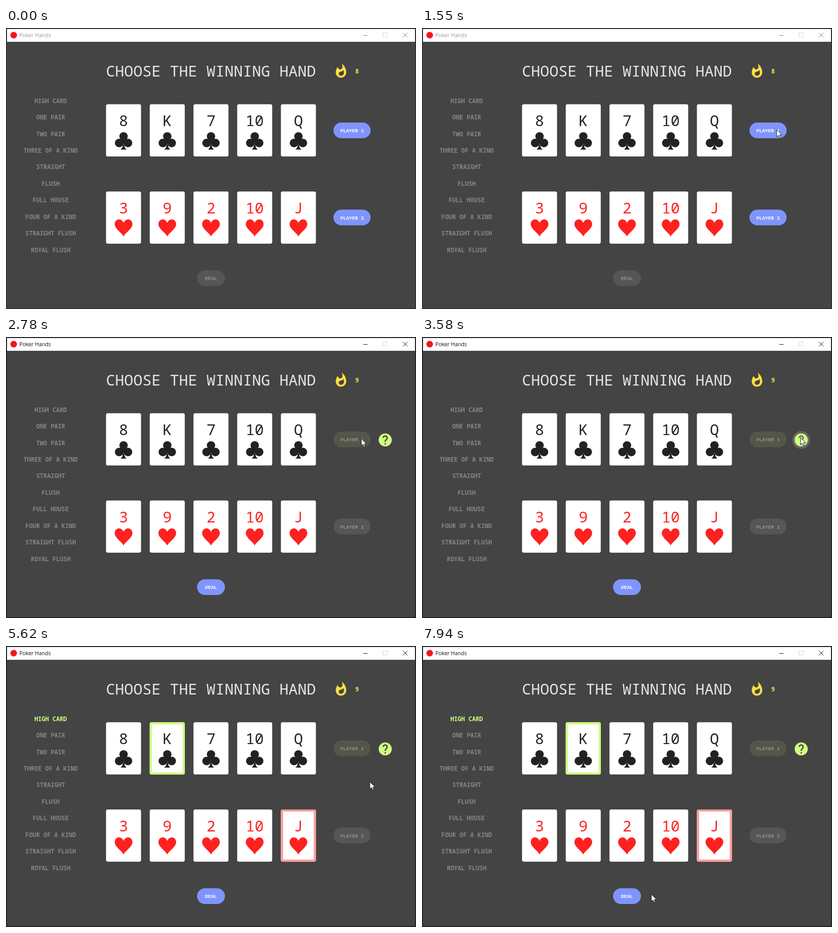
Write an HTML page that moves like this. It is 800x550 px and loops after 8000 ms.

```html
<!DOCTYPE html>
<html lang="en">
<head>
<meta charset="utf-8">
<title>Poker Hands</title>
<style>
html, body { margin: 0; width: 100%; height: 100%; overflow: hidden; background: #444; }
svg { display: block; width: 800px; height: 550px; }
text { font-family: "Noto Sans Mono", "DejaVu Sans Mono", monospace; text-anchor: middle; }
.bar { font: 10.4px "Open Sans", "Noto Sans", sans-serif; text-anchor: start; }
.title { font-size: 29.7px; text-anchor: start; fill: #e6e6e6; }
.label { font-size: 11.75px; font-weight: 700; }
.rank { font-size: 29.5px; }
.button { font-size: 9.6px; font-weight: 700; }
.score { font-size: 11.75px; font-weight: 700; fill: #ffdf40; }
</style>
</head>
<body>
<svg id="stage" viewBox="0 0 800 550">
  <defs>
    <g id="club" fill="#222">
      <circle cy="8.2" r="8.2"/><circle cx="-8.6" cy="21.2" r="8.4"/><circle cx="8.6" cy="21.2" r="8.4"/>
      <path d="M-2 13H2L5 20-1 24H1.4C1.6 29 3 32 6 34H-6C-3 32-1.6 29-1.4 24L-5 20Z"/>
    </g>
    <path id="heart" fill="#ff2020" d="M0 34C-2 27-17.3 19-17.3 9.5-17.3 4-13.5 0-9 0-5 0-1.5 3 0 7 1.5 3 5 0 9 0 13.5 0 17.3 4 17.3 9.5 17.3 19 2 27 0 34Z"/>
  </defs>
  <rect width="800" height="550" fill="#444"/>
  <rect width="800" height="27" fill="#fff"/>
  <circle cx="15" cy="14" r="6.5" fill="#f01818"/>
  <text id="caption" class="bar" x="26" y="18">Poker Hands</text>
  <g id="controls" fill="none">
    <path d="M697 14.5H705.5M774.5 9.5L783.5 18.5M783.5 9.5L774.5 18.5"/>
    <rect x="735.5" y="9.5" width="8" height="8" stroke="#d8d8d8"/>
  </g>
  <rect id="edge" x="1.5" y="1.5" width="797" height="547" fill="none"/>
  <rect x=".5" y=".5" width="799" height="549" fill="none" stroke="#231f22"/>
  <text class="title" x="195" y="95">CHOOSE THE WINNING HAND</text>
  <path fill="#ffdf40" transform="translate(638.3 69.2) scale(1.28)" d="M13.5.67s.74 2.65.74 4.8c0 2.06-1.35 3.73-3.41 3.73-2.07 0-3.63-1.67-3.63-3.73l.03-.36C5.21 7.51 4 10.62 4 14c0 4.42 3.58 8 8 8s8-3.58 8-8C20 8.61 17.41 3.8 13.5.67zM11.71 19c-1.78 0-3.22-1.4-3.22-3.14 0-1.62 1.05-2.76 2.81-3.12 1.77-.36 3.6-1.21 4.62-2.58.39 1.29.59 2.65.59 4.04 0 2.65-2.15 4.8-4.8 4.8z"/>
  <text id="score" class="score" x="685" y="89"></text>
  <g id="table"></g>
  <circle id="halo" cx="740" cy="201.5" r="17.3" fill="#666"/>
  <path id="help" fill="#d0ff80" transform="translate(724.6 186.1) scale(1.28)" d="M12 2C6.48 2 2 6.48 2 12s4.48 10 10 10 10-4.48 10-10S17.52 2 12 2zm1 17h-2v-2h2v2zm2.07-7.75l-.9.92C13.45 12.9 13 13.5 13 15h-2v-.5c0-1.1.45-2.1 1.17-2.83l1.24-1.26c.37-.36.59-.86.59-1.41 0-1.1-.9-2-2-2s-2 .9-2 2H8c0-2.21 1.79-4 4-4s4 1.79 4 4c0 .88-.36 1.68-.93 2.25z"/>
  <path id="cursor" fill="#fff" stroke="#111" stroke-width=".9" d="M.5 0V14L3.7 11 5.9 16 8.2 15 6.1 10.2H10.5Z"/>
</svg>
<script>
const $ = id => document.getElementById(id);
const table = $('table');
const GREEN = '#d0ff80', PINK = '#ff9d9d';
const BLUE = [128, 149, 252], GREY = [86, 86, 86], WHITE = [255, 255, 255], DIM = [145, 145, 145];

function add(tag, attrs, text = '') {
  const el = document.createElementNS('http://www.w3.org/2000/svg', tag);
  for (const k in attrs) el.setAttribute(k, attrs[k]);
  el.textContent = text;
  return table.appendChild(el);
}

const labels = ['HIGH CARD', 'ONE PAIR', 'TWO PAIR', 'THREE OF A KIND', 'STRAIGHT', 'FLUSH',
  'FULL HOUSE', 'FOUR OF A KIND', 'STRAIGHT FLUSH', 'ROYAL FLUSH'
].map((name, i) => add('text', { class: 'label', x: 87.2, y: 146.8 + 32.42 * i }, name));

function hand(y, ranks, suit, color) {
  return ranks.map((rank, i) => {
    const x = 195.2 + 85.3 * i, box = { x, y, width: 68.3, height: 102.3, rx: 3.4 };
    add('rect', { ...box, y: y + 1.2, fill: '#000', opacity: .22 });
    add('rect', { ...box, fill: '#fff' });
    add('text', { class: 'rank', x: x + 34.2, y: y + 43, fill: color }, rank);
    add('use', { href: '#' + suit, transform: `translate(${x + 34.2} ${y + 54.6})` });
    return add('rect', { x: x + 2.1, y: y + 2.1, width: 64.1, height: 98.1, rx: 1.6, fill: 'none', 'stroke-width': 4.2 });
  });
}
const hands = [
  hand(149.3, ['8', 'K', '7', '10', 'Q'], 'club', '#222'),
  hand(319.9, ['3', '9', '2', '10', 'J'], 'heart', '#ff2020')
];

function button(x, y, width, name) {
  const rect = add('rect', { x, y, width, height: 30.7, rx: 15.35 });
  const text = add('text', { class: 'button', x: x + width / 2, y: y + 19 }, name);
  return (fill, ink) => {
    rect.setAttribute('fill', `rgb(${fill})`);
    text.setAttribute('fill', `rgb(${ink})`);
  };
}
const paintOne = button(639, 185.1, 72.4, 'PLAYER 1');
const paintTwo = button(639, 355.6, 72.4, 'PLAYER 2');
const paintDeal = button(372.8, 474.2, 54.4, 'DEAL');

// Interpolates vectors between [time, ...values] keys.
function track(keys, t) {
  const i = keys.findIndex(k => k[0] > t);
  if (i < 0) return keys[keys.length - 1].slice(1);
  if (i === 0) return keys[0].slice(1);
  const a = keys[i - 1], b = keys[i], p = (t - a[0]) / (b[0] - a[0]);
  return a.slice(1).map((v, n) => v + (b[n + 1] - v) * p);
}
const smooth = p => p * p * (3 - 2 * p);
const ramp = (t, from, to) => Math.min(1, Math.max(0, (t - from) / (to - from)));
const mix = (a, b, p) => a.map((v, i) => v + (b[i] - v) * p);

const approach = [[500, 617, 527], [710, 632, 430], [930, 654.5, 336], [1100, 672, 270], [1270, 686, 229], [1550, 691.5, 199]];
const moves = [[2720, 3310, 736, 197], [3400, 3570, 738, 197], [4300, 4800, 709.5, 266], [7220, 7940, 447, 486]];

function cursorAt(t) {
  let pos = track(approach, t);
  for (const [from, to, x, y] of moves) pos = mix(pos, [x, y], smooth(ramp(t, from, to)));
  return pos;
}

function draw(t) {
  const active = t >= 1750, flush = t >= 3640 && t < 5620, high = t >= 5620;
  $('caption').setAttribute('fill', active ? '#111' : '#999');
  $('controls').setAttribute('stroke', active ? '#222' : '#888');
  $('edge').setAttribute('stroke', active ? '#2a282a' : '#414141');
  $('score').textContent = t < 2150 ? 8 : 9;

  const p = ramp(t, 1750, 1930);
  paintOne(track([[1750, ...BLUE], [1930, 108, 111, 98], [2300, 83, 87, 74]], t), mix(WHITE, DIM, p));
  paintTwo(mix(BLUE, GREY, p), mix(WHITE, DIM, p));
  paintDeal(mix(GREY, BLUE, p), mix(DIM, WHITE, p));

  labels.forEach((el, i) =>
    el.setAttribute('fill', flush && i === 5 || high && i === 0 ? GREEN : '#858585'));
  hands.forEach((cards, row) => cards.forEach((el, i) => {
    const best = high && i === (row ? 4 : 1);
    el.setAttribute('stroke', flush ? GREEN : best ? (row ? PINK : GREEN) : 'none');
  }));

  $('help').setAttribute('opacity', ramp(t, 2100, 2450));
  $('halo').setAttribute('opacity', t < 3640 ? ramp(t, 3420, 3540) : 0);
  $('cursor').setAttribute('visibility', t < 500 ? 'hidden' : 'visible');
  $('cursor').setAttribute('transform', `translate(${cursorAt(t)})`);
}

const start = performance.now();
function frame() {
  draw((performance.now() - start) % 8000);
  requestAnimationFrame(frame);
}
frame();
</script>
</body>
</html>
```
